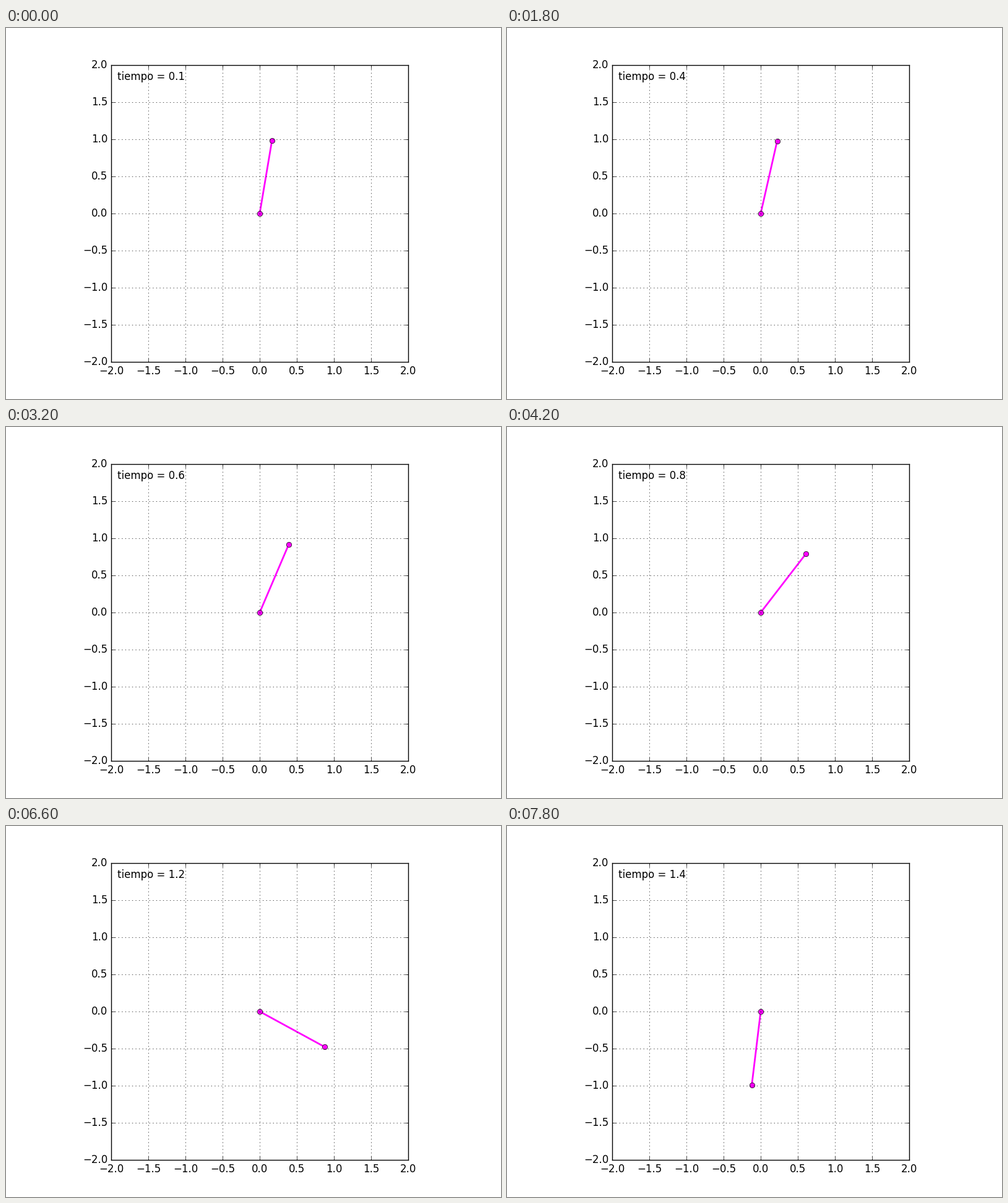
Recreate the animation shown at these times as a matplotlib script. Size 800 by 600 pixels, loop 8 s.

```python
import numpy as np
import matplotlib.pyplot as plt
from matplotlib.animation import FuncAnimation

plt.style.use("classic")
plt.rcParams.update({
    "font.family": "DejaVu Sans",
    "savefig.dpi": "figure",
    "savefig.facecolor": "white",
})

G, LENGTH = 9.8, 1.0
DT = 1 / 30        # simulated seconds per frame
FIRST_STEP = 2     # steps already simulated when the loop opens
FRAMES = 40
SUBSTEPS = 20


def deriv(state):
    angle, speed = state
    return np.array([speed, -G / LENGTH * np.sin(angle)])


def rk4(state, h):
    k1 = deriv(state)
    k2 = deriv(state + h / 2 * k1)
    k3 = deriv(state + h / 2 * k2)
    k4 = deriv(state + h * k3)
    return state + h / 6 * (k1 + 2 * k2 + 2 * k3 + k4)


def simulate(steps):
    """Angle of the pendulum, measured from straight down, at each step."""
    state = np.radians([170.0, 10.0])
    angles = [state[0]]
    for _ in range(steps):
        for _ in range(SUBSTEPS):
            state = rk4(state, DT / SUBSTEPS)
        angles.append(state[0])
    return angles


angles = simulate(FIRST_STEP + FRAMES)

fig = plt.figure(figsize=(8, 6), dpi=100, facecolor="white")
ax = fig.add_subplot(111, aspect="equal", xlim=(-2, 2), ylim=(-2, 2))
ax.grid(True)

rod, = ax.plot([], [], "o-", color="magenta", lw=2, ms=6, mec="black", mew=0.5)
clock = ax.text(0.02, 0.95, "", transform=ax.transAxes)


def draw(frame):
    step = FIRST_STEP + frame
    angle = angles[step]
    rod.set_data([0, LENGTH * np.sin(angle)], [0, -LENGTH * np.cos(angle)])
    clock.set_text(f"tiempo = {step * DT:.1f}")
    return rod, clock


anim = FuncAnimation(fig, draw, frames=FRAMES, interval=200, repeat=True,
                     repeat_delay=0, blit=False)
plt.show()
```
